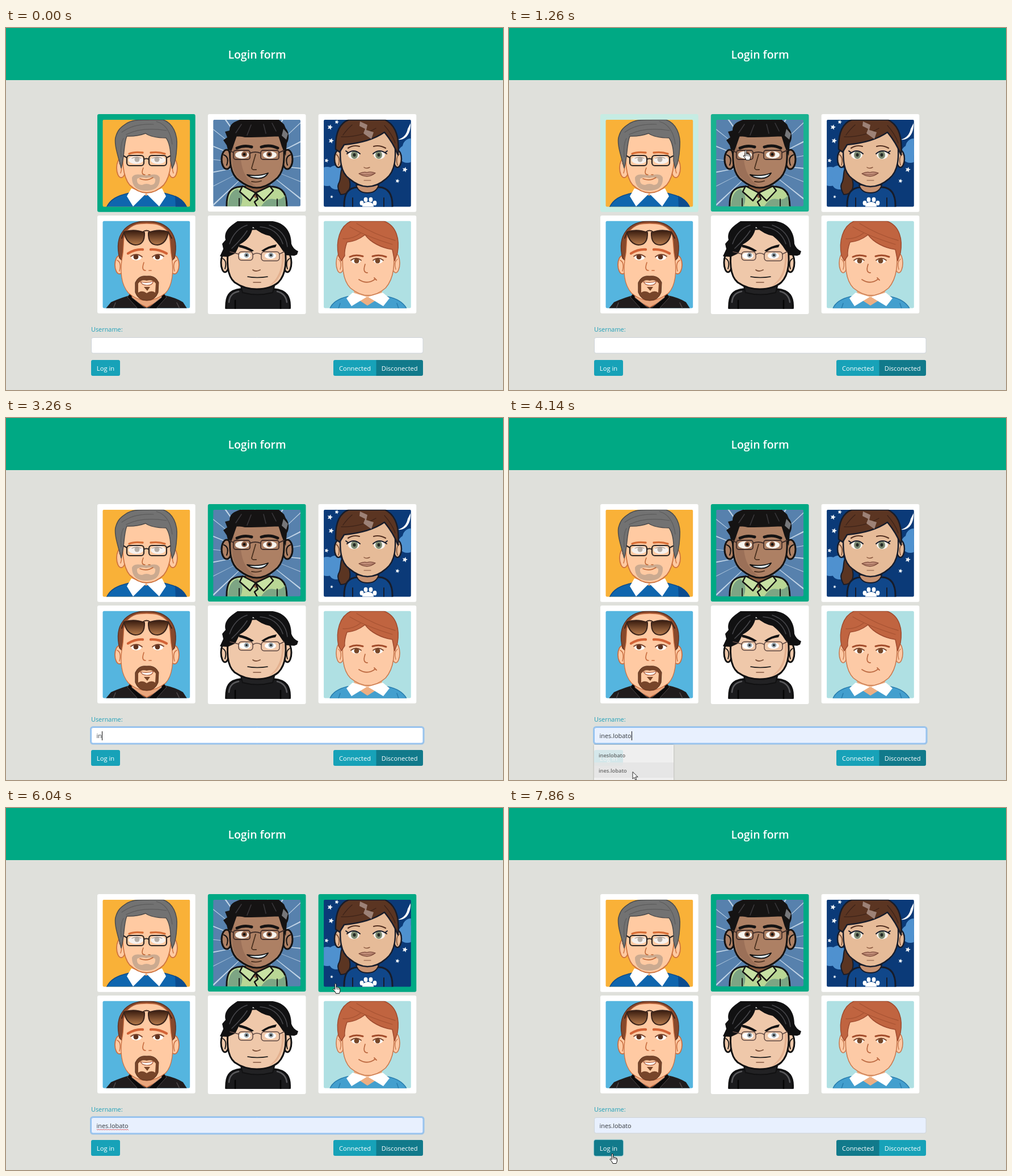
Write an HTML page with a canvas that moves like this. It is 876 by 639 pixels and loops after 8 s.

```html
<!DOCTYPE html>
<html lang="en">
<head>
<meta charset="utf-8">
<title>Login form</title>
<style>
html, body { margin: 0; width: 100%; height: 100%; overflow: hidden; background: #dfe0db; }
canvas { display: block; }
</style>
</head>
<body>
<canvas id="stage" width="876" height="639"></canvas>
<script>
const LOOP = 8000, GREEN = [0, 169, 132], TEAL = '#17a2b8', DARK = '#117a8b';
const FONT = '"Open Sans", "Noto Sans", sans-serif';
const NAMES = ['ineslobato', 'ines.lobato'];
const screen = document.getElementById('stage').getContext('2d');
const layer = document.createElement('canvas');
layer.width = 876; layer.height = 639;
let c = layer.getContext('2d');

// ---------- drawing helpers ----------
function paint(shape, fill, stroke, width = 1) {
  if (fill) { c.fillStyle = fill; c.fill(shape); }
  if (stroke) { c.strokeStyle = stroke; c.lineWidth = width; c.stroke(shape); }
}
const path = (d, ...style) => paint(new Path2D(d), ...style);
const line = (d, color, width) => path(d, null, color, width);
function oval(x, y, rx, ry, ...style) {
  const s = new Path2D();
  s.ellipse(x, y, rx, ry, 0, 0, 7);
  paint(s, ...style);
}
function box(x, y, w, h, r, ...style) {
  const s = new Path2D();
  s.roundRect(x, y, w, h, r);
  paint(s, ...style);
}
function text(str, x, y, size, color, weight = 400, align = 'left') {
  c.font = `${weight} ${size}px ${FONT}`;
  c.textAlign = align;
  c.fillStyle = color;
  c.fillText(str, x, y);
  return c.measureText(str).width;
}
function pair(x1, x2, y, rx, ry, ...style) {
  oval(x1, y, rx, ry, ...style);
  oval(x2, y, rx, ry, ...style);
}
function star(x, y, r) {
  c.beginPath();
  for (let i = 0; i < 10; i++) {
    const a = i * Math.PI / 5 - 1.3, q = i % 2 ? r * .45 : r;
    c.lineTo(x + q * Math.cos(a), y + q * Math.sin(a));
  }
  c.fillStyle = '#f4f8fb';
  c.fill();
}

// ---------- portraits ----------
function greyMan() {
  const skin = '#ffcaa2', edge = '#cf743f';
  path('M170 162H325V317H170Z', '#f9b138');
  path('M177 317C184 302 196 296 218 291H277C300 296 312 302 319 317Z', '#0f66ae', '#114c87', 1.5);
  path('M298 296Q313 302 319 317H299Z', '#0b4c8f');
  path('M223 270H274L272 287L247 296L223 287Z', '#efa774');
  path('M221 283L213 297L224 315L247 292L270 315L282 297L275 283L247 292Z', '#fff');
  pair(203, 294, 247, 8, 17, skin, edge, 1.8);
  line('M200 239Q206 245 202 256M297 239Q291 245 295 256', edge, 1.5);
  path('M207 190C203 232 206 263 218 277Q233 291 248 291Q264 291 278 277C292 260 293 228 290 190C286 168 211 168 207 190Z', skin, edge, 1.8);
  path('M203 247C197 224 189 202 194 190C198 177 206 173 213 168C226 160 240 163 254 162H277C294 168 303 187 301 210Q300 235 293 248L290 234C291 214 287 200 282 194C266 194 253 191 246 186C230 192 220 191 213 191C207 205 209 229 203 247Z', '#727272', '#4c4c4c', 1.5);
  line('M204 184Q225 168 260 170M212 188Q240 174 283 181M207 195Q201 205 203 228M265 165Q289 172 293 205', '#5c5c5c', 1.2);
  line('M217 222Q226 218 241 220M255 220Q269 218 280 222', '#d56c35', 3.4);
  pair(229, 268, 233, 13, 7, '#f6f1ed');
  pair(231, 266, 232, 4.5, 4.5, '#b5aca5');
  line('M222 230Q230 226 238 230M258 230Q267 226 275 230', '#b39a8a', 1.3);
  box(213, 225, 30, 18, 5, null, '#2a2624', 2.2);
  box(252, 225, 31, 18, 5, null, '#2a2624', 2.2);
  line('M243 232Q247 229 252 232M213 229L208 226M283 229L289 226', '#2a2624', 2.2);
  path('M222 264C226 256 238 259 247 260C256 259 267 256 271 264C272 281 262 287 247 287C232 287 222 281 222 264Z', '#cbaa90');
  path('M231 266Q239 262 247 265Q256 262 263 266Q264 277 255 277Q248 273 240 277Q230 277 231 266Z', skin);
  line('M236 266Q248 271 259 264M242 247Q237 259 245 259M251 259H254', '#bf693a', 1.6);
}

function spikyMan() {
  const ink = '#151313', skin = '#ad8064';
  path('M364 162H520V316H364Z', '#5781ad');
  for (let i = 0; i < 22; i++) {
    const a = i * Math.PI / 11 + .1, w = i % 2 ? .006 : .012;
    c.beginPath();
    c.moveTo(442, 240);
    for (const s of [-w, w]) c.lineTo(442 + 130 * Math.cos(a + s), 240 + 130 * Math.sin(a + s));
    c.fillStyle = '#c3d6e7';
    c.fill();
  }
  path('M389 318C388 291 395 281 414 280H470C489 282 495 293 495 318Z', '#b9d795', ink, 3);
  path('M391 316C392 298 397 287 408 284Q422 296 413 316ZM449 316Q459 299 472 302T492 295L493 316Z', '#7da584');
  line('M411 301V316M478 302V316', ink, 1.8);
  path('M420 276H464L440 301Z', '#8a5d40');
  path('M417 279L412 289L430 305L440 291L454 305L471 287L465 279L440 291Z', '#c7e1a3', ink, 2.5);
  line('M440 291L444 302L438 307L443 316', ink, 2.5);
  pair(389, 496, 232, 9, 17, skin, ink, 3);
  line('M384 224Q394 228 389 242M501 224Q491 228 496 242', ink, 2);
  path('M397 190C391 240 397 260 411 269Q427 282 442 282Q458 282 473 269C490 258 493 235 488 190Z', skin, ink, 3);
  path('M399 205C396 243 401 259 413 267Q427 279 440 279Q417 264 414 232Z', '#9b7058');
  path('M394 226L389 207L383 198L390 193L386 183L394 181C394 169 402 166 412 162H481L490 170L493 177C500 184 499 198 495 203L493 226L486 209L480 190Q466 193 421 193L407 190L400 210Z', ink);
  path('M489 178L497 187L494 197L486 190Z', '#77777a');
  line('M405 185L415 170M425 189L432 171M458 186L454 170M476 182L469 168', '#3b383c', 1.5);
  line('M407 212Q420 206 433 210M450 210Q465 205 479 212', ink, 5);
  pair(416, 465, 224, 12, 6.5, '#f6f3ee');
  pair(420, 464, 223, 5, 5, '#8d5d43');
  pair(420, 464, 223, 2.5, 2.5, ink);
  box(401, 216, 29, 16, 4, null, '#432f2a', 1.8);
  box(449, 216, 32, 16, 4, null, '#432f2a', 1.8);
  line('M430 221Q439 217 449 221M401 220L394 216M481 220L490 216', '#432f2a', 2);
  line('M440 223L433 247Q433 251 441 250', '#49301f', 1.8);
  path('M425 259Q443 263 462 256Q456 267 440 265Q430 264 425 259Z', '#e1eef3', ink, 1.8);
  line('M433 271Q442 273 450 270', '#4b3020', 1.8);
}

function nightGirl() {
  const ink = '#171c2a', skin = '#e6bb98', hair = '#5b3522';
  path('M559 162H715V316H559Z', '#0b3a78');
  for (const [x, y, r] of [[566, 262, 17], [580, 256, 13], [582, 272, 13], [707, 222, 16], [714, 210, 15]]) oval(x, y, r, r, '#4f91cf');
  path('M713 168C714 185 705 199 691 197Q705 193 708 178Z', '#fff');
  for (const [x, y, r] of [[571, 175, 5], [583, 166, 4], [573, 199, 5], [565, 234, 4], [703, 250, 5], [690, 270, 4], [574, 298, 3]]) star(x, y, r);
  path('M600 238C585 249 593 265 586 275Q583 282 590 294C607 294 609 278 604 264Z', hair, ink, 2);
  path('M596 318C595 291 603 282 620 281H658C676 282 682 296 681 318Z', '#10478a', ink, 3);
  line('M611 300V317M666 300V317', ink, 2);
  path('M617 277H657Q653 291 637 291T617 277Z', '#c69170', ink, 2);
  oval(638, 314, 10, 7, '#fff');
  pair(627, 650, 309, 3.4, 4.2, '#fff');
  pair(634, 643, 303, 3.4, 4.2, '#fff');
  pair(586, 690, 231, 7, 15, skin, ink, 2.5);
  line('M582 223Q590 229 586 242M693 223Q686 229 690 242', '#815338', 1.6);
  path('M591 190C586 236 591 256 605 266Q622 280 637 280Q654 280 670 266C686 253 689 230 684 190C676 170 598 170 591 190Z', skin, ink, 2.5);
  path('M581 214C580 184 588 168 604 162H668C686 171 694 192 691 224C685 209 677 196 667 184C647 198 618 204 596 206L588 219Z', hair, ink, 2.5);
  line('M591 192Q624 193 652 177M610 171Q600 180 594 189M667 172Q681 188 686 203', '#3d2319', 1.3);
  path('M624 165L637 171L635 180L648 184L644 196L630 186L633 178L623 173Z', '#9d8277');
  line('M603 212Q612 206 623 209M648 209Q658 206 669 212', '#533021', 2.2);
  pair(613, 658, 224, 10, 7.5, '#faf6f0');
  pair(614, 657, 224, 6, 7, '#7c8a72');
  pair(614, 657, 224, 2.6, 3, '#262a25');
  line('M601 222Q613 212 624 222M647 222Q658 212 671 222M599 217L603 220M672 217L668 220', ink, 2);
  line('M631 246Q635 249 641 246', '#8a5940', 1.5);
  path('M622 257Q631 253 636 255Q643 253 651 256Q637 267 622 257Z', '#c5917c', '#794839', 1.3);
  line('M624 258Q636 260 649 257M631 269H643', '#8a5845', 1.1);
}

function goateeMan() {
  const skin = '#ffcaa3', edge = '#c96f42', ink = '#201c1d', beard = '#77452a';
  path('M170 340H325V495H170Z', '#55b5df');
  path('M176 495L185 484Q205 475 222 471H276Q300 476 312 484L319 495Z', ink);
  path('M221 463H277L274 480L248 493L222 480Z', '#e9a67d', edge, 1.5);
  path('M221 466L214 475L232 495H246L222 476ZM276 466L283 475L265 495H250L274 476Z', '#0b0a0b', '#4d4849', 1);
  line('M193 485L189 495M301 485L306 495', '#504a4b', 1.5);
  pair(200, 297, 418, 8, 16, skin, edge, 1.8);
  line('M196 410Q204 414 200 429M301 410Q293 414 297 429', edge, 1.5);
  path('M200 406C190 365 211 341 248 341C286 341 306 365 297 406L291 412H206Z', '#87482b', '#5d2f20', 1.3);
  path('M206 398C208 380 206 368 212 359C224 345 236 345 248 345C260 345 273 345 285 359C290 368 289 380 291 398C297 430 293 456 281 468Q264 481 248 481Q231 481 216 468C202 452 200 428 206 398Z', skin, edge, 1.3);
  const glass = c.createLinearGradient(0, 358, 0, 383);
  glass.addColorStop(0, '#3a1d10');
  glass.addColorStop(1, '#b77b4c');
  path('M208 360Q225 354 244 361Q245 383 228 383Q212 381 208 360ZM251 361Q270 354 286 360Q283 381 267 383Q250 383 251 361Z', glass, '#3a241b', 2);
  line('M241 360Q248 355 254 360M208 360L204 371M286 360L292 371', '#3a241b', 2);
  line('M215 398Q228 390 241 391M255 391Q269 390 283 398', '#d26337', 4.4);
  pair(230, 268, 405, 9, 5, '#fff');
  pair(229, 267, 404, 4.5, 4.5, '#60331f');
  line('M220 403Q230 396 240 404M258 404Q268 396 278 403', '#77432e', 1.8);
  line('M243 414Q238 428 246 428M252 428H256', edge, 1.7);
  path('M228 449Q234 436 248 438Q263 436 269 449L268 467Q263 481 248 481Q233 481 228 467Z', beard, '#593220', 1);
  path('M233 451Q239 443 248 446Q258 443 264 451L263 467Q256 462 248 468Q240 462 233 467Z', skin);
  path('M237 448Q248 451 260 447Q257 455 248 454Q240 454 237 448Z', '#fff', '#a75639', 1.2);
  path('M243 457H254L249 464Z', beard);
}

function darkMan() {
  const ink = '#111112', skin = '#efc8aa';
  path('M364 340H520V497H364Z', '#fff');
  path('M388 497C387 473 393 463 414 461H472C495 463 502 475 500 497Z', '#1b1b1d', ink, 3.5);
  line('M393 484Q394 468 410 465M495 484Q493 469 478 465', '#59595c', 2.5);
  path('M414 456H473L470 467Q443 474 417 467Z', '#222224', ink, 2);
  line('M404 481V496M484 481V496', '#050505', 2.5);
  pair(386, 496, 414, 7, 17, skin, ink, 3);
  line('M382 407Q390 411 386 425M500 407Q492 411 496 425', ink, 1.8);
  path('M394 375C386 420 392 440 403 449Q420 461 442 461Q466 461 480 449C493 436 497 410 489 375C482 348 402 348 394 375Z', skin, ink, 3);
  path('M486 395C488 424 480 444 462 456Q490 445 490 400Z', '#e3b08f');
  path('M377 403L383 390L381 381L387 374C383 358 396 349 408 341H470C492 344 503 360 503 381Q506 390 515 394L513 400L508 402L494 401L487 392Q478 377 465 367Q449 364 435 351Q432 372 412 382L404 398L391 404Z', ink);
  line('M394 381Q403 355 425 348M398 389Q416 372 425 358M448 351Q478 353 488 381M464 348Q493 358 496 386', '#46464a', 1.6);
  path('M409 382Q423 384 437 393L433 395Q421 389 411 387ZM450 393Q463 384 477 382L475 387Q463 388 454 395Z', ink);
  pair(421, 466, 402, 10, 5.5, '#fff');
  pair(424, 467, 401, 4.4, 4.4, '#93a0a8');
  pair(424, 467, 401, 1.8, 1.8, ink);
  box(410, 395, 25, 15, 5, null, '#5f4842', 1.5);
  box(450, 395, 32, 16, 5, null, '#5f4842', 1.5);
  line('M435 400Q442 395 450 400M410 399L395 395M482 399L490 395', '#5f4842', 1.7);
  line('M435 427Q440 431 448 427', '#7c4f37', 1.8);
  line('M426 439Q442 442 461 439', ink, 1.6);
  line('M436 449H449', '#835740', 1.6);
}

function redBoy() {
  const skin = '#fdcaa6', edge = '#c97a50', hair = '#c06440';
  path('M559 340H715V495H559Z', '#afe0e3');
  path('M571 495Q577 480 602 474H672Q697 479 706 495Z', '#439fce', '#287dae', 1.5);
  line('M589 486L586 495M689 486L692 495', '#287dae', 1.5);
  path('M613 459H664L661 475L637 490L614 475Z', '#edae82');
  path('M611 467L600 477L609 491L637 474L665 491L676 477L664 467L637 475Z', '#fff');
  pair(589, 687, 415, 7, 17, skin, edge, 1.6);
  line('M586 408Q593 413 589 426M690 408Q683 413 687 426', edge, 1.4);
  path('M596 376C590 421 594 446 607 459Q623 472 638 472Q654 472 669 459C684 442 687 416 681 376C680 345 597 345 596 376Z', skin, edge, 1.6);
  path('M591 411L586 402C581 376 588 350 608 341H666C689 349 694 374 690 397L685 411L681 391C661 388 642 378 633 365Q617 377 601 378Q596 392 597 402Z', hair, '#9f4b2f', 1.5);
  line('M606 351Q632 367 681 382M618 345Q650 365 686 375M594 372Q611 373 625 362', '#a75333', 1.3);
  line('M606 404Q616 399 629 403M646 403Q658 399 670 404', '#a34d2c', 3);
  pair(617, 656, 411, 8, 5, '#fff');
  pair(618, 655, 411, 4.5, 4.5, '#764627');
  line('M608 410Q617 403 626 410M647 410Q656 403 665 410', '#744129', 1.8);
  line('M633 417Q628 432 637 432M622 444Q637 454 651 443M649 441L653 445', '#bd6b43', 1.8);
}

// ---------- layout ----------
const cards = [greyMan, spikyMan, nightGirl, goateeMan, darkMan, redBoy].map((draw, i) => ({
  draw, x: 161 + 194.8 * (i % 3), y: i < 3 ? 152 : 331, h: i === 4 ? 174 : i === 1 ? 172 : 172.7
}));
const inside = (p, x, y, w, h) => p && p.x >= x && p.x < x + w && p.y >= y && p.y < y + h;
const cardAt = p => cards.findIndex(k => inside(p, k.x, k.y, 172.7, k.h));
const clamp = v => Math.max(0, Math.min(1, v));

c.lineCap = c.lineJoin = 'round';
for (const { draw, x, y, h } of cards) {
  c.save();
  c.beginPath();
  c.roundRect(x + 9.5, y + 9.7, 153.7, h - 19, 2.5);
  c.clip();
  draw();
  c.restore();
}
c = screen;
c.lineCap = c.lineJoin = 'round';

// ---------- motion ----------
const track = [
  [410, 744, 30], [640, 640, 140], [900, 529, 200], [1060, 424, 214], [1260, 418, 216],
  [1360, 330, 180], [1640, 10, 74], [1890, 0, 622], [2000, 165, 480], [2070, 196, 506],
  [2370, 213, 543], [2600, 229, 561], [3500, 229, 561], [3880, 222, 597], [4140, 218, 625],
  [4300, 220, 625], [4780, 342, 560], [5080, 342, 560], [5100, 358.5, 547.5], [5600, 562, 324],
  [6040, 580, 310], [6220, 660, 280], [6420, 743, 350], [6760, 618, 606], [6910, 618, 606],
  [7680, 182, 610], [8000, 182, 610]
];
const hidden = [[0, 410], [1645, 1890], [3100, 3500]];
const PICK = 960, FOCUS = 2640, OPEN = 3510, CHOOSE = 4110, BLUR = 6920, SUBMIT = 7740;

function pointer(t) {
  if (hidden.some(([a, b]) => t >= a && t < b)) return null;
  const i = track.findIndex(k => k[0] > t), [t0, x0, y0] = track[i - 1], [t1, x1, y1] = track[i];
  const k = (t - t0) / (t1 - t0);
  return { x: x0 + (x1 - x0) * k, y: y0 + (y1 - y0) * k };
}

// Border tint of every card, sampled through one loop.
const STEP = 10, tints = [];
let tint = [1, 0, 0, 0, 0, 0];
for (let t = 0; t < LOOP; t += STEP) {
  const over = cardAt(pointer(t)), chosen = t < PICK ? 0 : 1;
  tint = tint.map((v, i) => clamp(v + (i === over || i === chosen ? 1 : -1) * STEP / 400));
  tints.push(tint);
}

function drawCards(t) {
  const now = tints[Math.floor(t / STEP)];
  cards.forEach((k, i) => {
    const rgb = GREEN.map(v => Math.round(255 + (v - 255) * now[i]));
    box(k.x, k.y, 172.7, k.h, 3, `rgb(${rgb})`);
  });
  c.drawImage(layer, 0, 0);
}

function drawButton(label, x, w, corners, p, active) {
  box(x, 586, w, 28, corners, active ? DARK : inside(p, x, 586, w, 28) ? '#138496' : TEAL);
  text(label, x + w / 2, 604.5, 11.2, '#fff', 400, 'center');
}

function fieldText(t, p) {
  if (t >= CHOOSE) return NAMES[1];
  if (t >= 3820) return NAMES[p.y < 608 ? 0 : 1];
  return t < 3180 ? '' : t < 3260 ? 'i' : 'in';
}

function drawField(t, p) {
  const focus = clamp((t - FOCUS) / 150) * clamp((BLUR + 150 - t) / 150);
  if (focus) box(149.3, 545.3, 587, 29.9, 4, null, `rgba(128,184,240,${.7 * focus})`, 2.6);
  box(150.5, 546.5, 584.5, 27.5, 3, t < 3820 ? '#fff' : '#e8f0fe', focus > .5 ? '#8fc0f5' : '#ced4da', 1);
  const width = text(fieldText(t, p), 159.5, 565, 10.9, '#33383d');
  const reset = [FOCUS - 40, 3180, 3260, CHOOSE].filter(r => r <= t).pop();
  const typing = t >= FOCUS && t < BLUR && (t < 3820 || t >= CHOOSE);
  if (typing && (t - reset) % 1000 < 500) {
    c.fillStyle = '#111';
    c.fillRect(Math.round(160 + width), 553, 1, 16);
  }
  if (t >= 5090 && t < BLUR) {
    c.beginPath();
    for (let x = 0; x <= width; x += 1.5) c.lineTo(160 + x, 567 + (x / 1.5 % 2) * 1.5);
    c.strokeStyle = '#d93a3a';
    c.lineWidth = .8;
    c.stroke();
  }
}

function drawMenu(t, p) {
  const alpha = clamp((t - OPEN + 40) / 120) * clamp((CHOOSE + 170 - t) / 170);
  if (!alpha) return;
  c.save();
  c.globalAlpha = alpha;
  c.shadowColor = 'rgba(0,0,0,.3)';
  c.shadowBlur = 3;
  box(150, 577, 140, 70, 0, '#fff');
  c.shadowBlur = 0;
  NAMES.forEach((name, i) => {
    const y = 581 + 27 * i;
    if (inside(p, 150, y, 140, 27)) box(150, y, 140, 27, 0, '#e5e5e5');
    text(name, 158, y + 18, 9.3, '#4c4c4c', 600);
  });
  c.restore();
}

function drawPointer(t, p) {
  if (!p) return;
  const menu = t >= OPEN && t < CHOOSE + 170 && inside(p, 150, 577, 140, 70);
  const button = inside(p, 150, 586, 51, 28) || inside(p, 577, 586, 158, 28);
  c.save();
  c.translate(p.x, p.y);
  if (!menu && (button || cardAt(p) >= 0)) {
    path('M-1 9V1Q0-.8 1.5 1V6.5Q3 5 4 7Q5.5 6 6.5 8Q8.5 7.5 8.5 10V13Q8 15 7 17.5H1Q0 14-4 10.5Q-4 8-1 10.5Z', '#fff', '#111', 1);
    line('M1.5 6.5V10M4 7.5V10.5M6.5 8.5V11', '#111', .8);
  } else if (!menu && inside(p, 150, 546, 585, 28)) {
    line('M-2.5-5.5H-.8L0-5L.8-5.5H2.5M0-5V5M-2.5 5.5H-.8L0 5L.8 5.5H2.5', '#222', 1);
  } else {
    path('M0 0V12L2.9 9.4L4.9 14L6.8 13.1L4.9 8.7H8.8Z', '#fff', '#111', .9);
  }
  c.restore();
}

function render(t) {
  const p = pointer(t), connected = t >= BLUR;
  c.fillStyle = '#dfe0db';
  c.fillRect(0, 0, 876, 639);
  c.fillStyle = `rgb(${GREEN})`;
  c.fillRect(0, 0, 876, 92);
  text('Login form', 442.5, 54, 19.5, '#fff', 600, 'center');
  drawCards(t);
  text('Username:', 150, 536, 10.9, '#1f9fb8');
  drawField(t, p);
  const ring = clamp((t - SUBMIT) / 100);
  if (ring) box(149.6, 585.6, 51.8, 28.8, 4, null, `rgba(23,162,184,${.35 * ring})`, 1.6);
  drawButton('Log in', 150, 51, 3, p, t >= SUBMIT);
  drawButton('Connected', 577, 76, [3, 0, 0, 3], p, connected);
  drawButton('Disconected', 652.5, 82.5, [0, 3, 3, 0], p, !connected);
  drawMenu(t, p);
  drawPointer(t, p);
}

const start = performance.now();
function tick() {
  render((performance.now() - start) % LOOP);
  requestAnimationFrame(tick);
}
tick();
</script>
</body>
</html>
```
